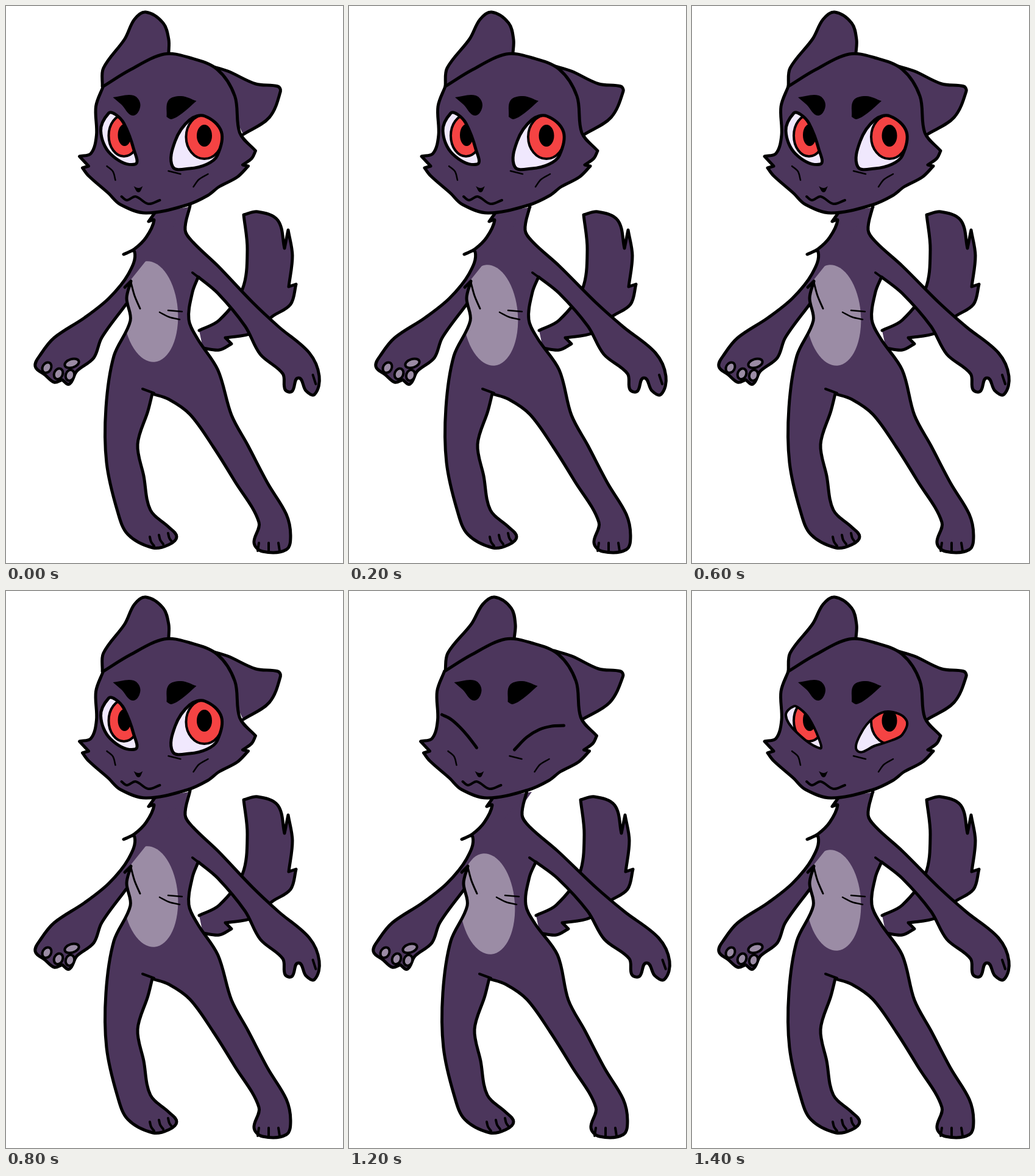
An HTML page with a canvas that plays this animation: 553 by 915 pixels, repeating every 1600 ms.

```html
<!DOCTYPE html>
<html lang="en">
<head>
<meta charset="utf-8">
<title>Idle creature</title>
<style>
html, body { margin: 0; width: 100%; height: 100%; overflow: hidden; background: #fff; }
canvas { display: block; }
</style>
</head>
<body>
<canvas id="stage" width="553" height="915"></canvas>
<script>
const ctx = document.getElementById('stage').getContext('2d');
const FUR = '#4c365c', PALE = '#9b8ca5', RED = '#f54343', WHITE = '#f0e8fd', INK = '#000';
const STEP = 200;
const BLINK = [0, 0, 0, 0, 0, .4, 1, .4];

let lean = 0; // -1 upright, 1 slumped
let shut = 0; // 0 open, 1 closed

// How each region follows the lean.
const sway = dx => (x, y) => [x + lean * dx(x, y), y];
const headMove = sway(() => -1.5);
const earMove = sway((x, y) => (130 - y) / 25);
const tailMove = sway(() => -5);
const armMove = sway(() => -4);
const bodyMove = sway((x, y) => x > 300 && y < 650 ? (x - 300) / 20 - 5 : -5);

// Lid lines the eyes close towards.
const lidL = x => 203 + 53 * Math.max(0, (x - 153) / 57) ** 1.5;
const lidR = x => 262 - 41 * (1 - Math.max(0, (353 - x) / 81) ** 2.5);
const squeeze = lid => (x, y) => headMove(x, y + (lid(x) - y) * shut);

// Smooth runs through key points; "/" marks a sharp corner.
function trace(text, move) {
  const path = new Path2D();
  let last = null;
  for (const run of text.split('/')) {
    const pts = run.trim().split(/\s+/).map(p => move(...p.split(',').map(Number)));
    if (last) pts.unshift(last);
    else path.moveTo(...pts[0]);
    const n = pts.length - 1;
    last = pts[n];
    const loop = n > 2 && pts[0].join() === last.join();
    const tangent = i => {
      const a = pts[i > 0 ? i - 1 : loop ? n - 1 : 0];
      const b = pts[i < n ? i + 1 : loop ? 1 : n];
      const d = Math.hypot(b[0] - a[0], b[1] - a[1]) || 1;
      return [(b[0] - a[0]) / d, (b[1] - a[1]) / d];
    };
    for (let i = 0; i < n; i++) {
      const p = pts[i], q = pts[i + 1], s = tangent(i), e = tangent(i + 1);
      const k = Math.hypot(q[0] - p[0], q[1] - p[1]) / 3;
      path.bezierCurveTo(p[0] + s[0] * k, p[1] + s[1] * k, q[0] - e[0] * k, q[1] - e[1] * k, q[0], q[1]);
    }
  }
  return path;
}

function oval(move, x, y, rx, ry, turn = 0) {
  const path = new Path2D();
  path.ellipse(...move(x, y), rx, ry, turn, 0, Math.PI * 2);
  return path;
}
function stroke(path, width = 5) {
  ctx.lineWidth = width;
  ctx.stroke(path);
}
function fill(path, color) {
  ctx.fillStyle = color;
  ctx.fill(path);
}
function part(text, move) {
  const path = trace(text, move);
  fill(path, FUR);
  stroke(path);
}
function inside(path, paint) {
  ctx.save();
  ctx.clip(path);
  paint();
  ctx.restore();
}
const line = (text, move, width) => stroke(trace(text, move), width);

function drawTail() {
  part(`312,533 345,516 383,465 391,400 385,343 / 408,338 441,352 452,398 / 458,368 /
    465,410 459,461 / 471,457 / 462,490 432,510 400,537 355,545 / 365,555 / 345,565 318,562`, tailMove);
}

function drawPaw() {
  const arm = trace(`240,340 230,354 / 239,352 226,380 207,399 189,408 / 207,404 197,440 165,480 125,512
    75,545 53,572 44,592 60,606 / 75,618 88,614 / 100,621 112,600 140,578 153,545 193,490`, armMove);
  const skin = new Path2D(arm);
  skin.lineTo(300, 330);
  fill(skin, FUR);
  stroke(arm);
  const pads = [0, 1, 2].map(i => oval(armMove, 63 + 19 * i, 594 + 13 * Math.sin(i * .9), 7, 9, .5 - .1 * i));
  pads.push(oval(armMove, 104, 587, 12, 7, -.3));
  for (const pad of pads) {
    fill(pad, PALE);
    stroke(pad, 4);
  }
}

function drawBody() {
  const legL = `190,462 200,452 / 193,480 199,517 172,575 159,660 160,750 178,830 195,868 236,890
    262,885 275,872 262,856 232,828 221,772 211,720 228,665 235,637`;
  const legR = `262,646 297,671 335,724 370,780 410,848 402,882 416,896 455,893 462,870 455,835
    425,785 392,722 365,672 345,598 310,547 295,515 301,470 311,445`;
  const armR = `345,472 392,526 418,572 457,604 461,630 473,633 484,611 497,632 512,638 520,608
    503,570 450,527 405,487 345,427 302,388 289,368 297,328`;
  const body = trace([legL, legR, armR].join(' / '), bodyMove);
  fill(body, FUR);
  const belly = oval(bodyMove, 232, 508 + lean * 6, 45, 83, -.08);
  inside(body, () => fill(belly, PALE));
  stroke(body);

  line('219,629 238,636', bodyMove, 4);
  line('301,438 312,446', bodyMove, 4);
  line('509,606 514,621', bodyMove, 4);
  line('200,454 206,476 215,497', bodyMove, 3);
  line('247,503 263,511 280,515', bodyMove, 2.5);
  line('261,500 284,502', bodyMove, 2.5);
  for (let i = 0; i < 3; i++) {
    const x = 231 + 15 * i, y = 872 - 3 * i, z = 410 + 16 * i;
    line(`${x},${y} ${x + 2},${y + 8} ${x + 7},${y + 15}`, bodyMove, 4);
    line(`${z},882 ${z + 2 * i - 2},895`, bodyMove, 4);
  }
}

function drawEye(outline, lid, iris, pupil) {
  const path = trace(outline, squeeze(lid));
  inside(path, () => {
    fill(path, WHITE);
    fill(iris, RED);
    stroke(iris, 4);
    fill(pupil, INK);
  });
  stroke(path, shut ? 4 : 5);
}
function drawLid(lid, from, to) {
  const pts = [0, .25, .5, .75, 1].map(t => from + (to - from) * t).map(x => `${x},${lid(x)}`);
  line(pts.join(' '), headMove, 5);
}

function drawEyes() {
  if (shut === 1) {
    drawLid(lidL, 154, 211);
    drawLid(lidR, 273, 354);
    return;
  }
  drawEye('210,260 170,243 154,205 167,176 178,178 192,193 208,235 210,260', lidL,
    oval(headMove, 192, 213, 25, 34), oval(headMove, 193, 212, 11, 18));
  drawEye('272,264 / 276,222 300,187 325,181 352,207 345,246 328,260 300,267 272,264', lidR,
    oval(headMove, 324, 215, 30, 36), oval(headMove, 324, 213, 12.5, 18));
}

function drawHead() {
  part('158,132 161,102 198,54 215,22 234,10 262,28 270,55 269,78', earMove);
  part('335,98 365,107 410,128 446,132 450,140 430,183 386,211', earMove);
  part(`158,132 202,105 258,79 300,85 345,104 374,148 382,208 408,238 / 402,250 387,261 / 396,263 /
    378,281 348,297 330,311 295,327 228,340 186,326 166,307 134,279 124,266 / 134,263 / 119,247 /
    138,242 147,212 146,165 158,132`, headMove);

  fill(trace('174,150 208,147 219,163 207,180 188,162 / 174,150', headMove), INK);
  fill(trace('262,182 265,155 286,148 311,156 / 288,176 270,186 262,182', headMove), INK);
  drawEyes();
  fill(trace('208,296 / 216,299 223,296 / 216,306 208,296', headMove), INK);
  line('188,313 197,319 211,313 232,325 251,319', headMove, 4);
  line('164,263 174,272 178,286', headMove, 2.5);
  line('265,271 285,276', headMove, 2.5);
  line('330,276 315,285 306,297', headMove, 2.5);
}

function draw(beat) {
  lean = Math.round(-Math.cos(beat * Math.PI / 2));
  shut = BLINK[beat];
  ctx.fillStyle = '#fff';
  ctx.fillRect(0, 0, 553, 915);
  ctx.strokeStyle = INK;
  ctx.lineJoin = ctx.lineCap = 'round';
  drawTail();
  drawPaw();
  drawBody();
  drawHead();
}

let shown = -1;
function tick() {
  const beat = Math.floor(performance.now() / STEP) % BLINK.length;
  if (beat !== shown) draw(shown = beat);
  requestAnimationFrame(tick);
}
tick();
</script>
</body>
</html>
```
